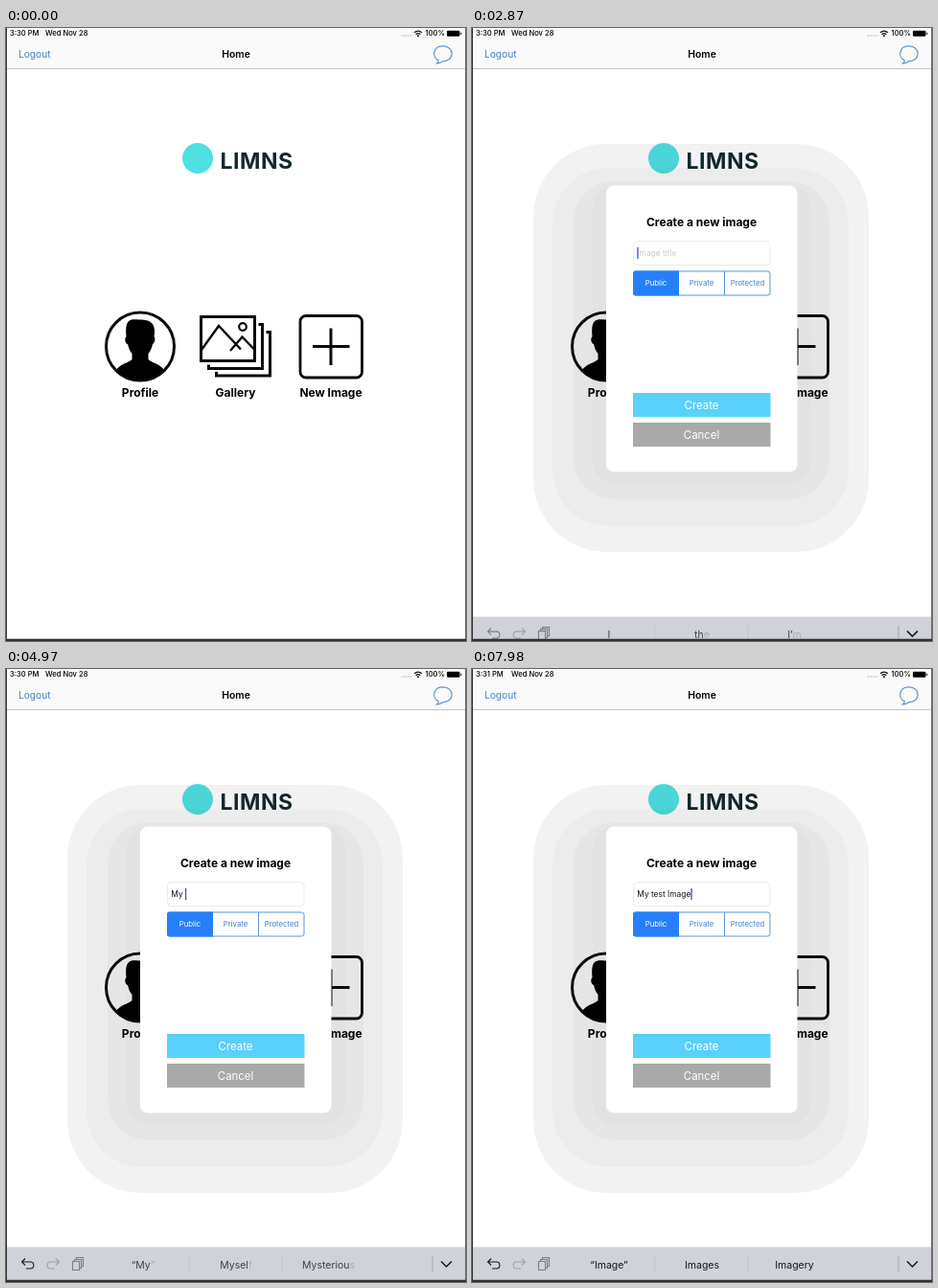
Recreate the animation shown at these times as an HTML page. Size 480 px wide and 640 px high, loop 8 s.

```html
<!DOCTYPE html>
<html lang="en">
<head>
<meta charset="utf-8">
<title>New image dialog</title>
<style>
  html, body { margin: 0; width: 100%; height: 100%; overflow: hidden; background: #fff; }
  svg { display: block; width: 480px; height: 640px; font-family: Inter, Roboto, sans-serif; }
  text { white-space: pre; }
  .mid { text-anchor: middle; }
  .bold { font-weight: 700; font-size: 12px; }
  .status { font-size: 7.6px; font-weight: 500; }
  .line { fill: none; stroke: #0b0b0b; stroke-width: 3; }
  .blue { fill: #4581c6; }
  .seg { font-size: 7.8px; }
  .field { font-size: 8.4px; }
  .action { font-size: 11.4px; fill: #fff; }
  .hint { font-size: 10.5px; fill: #16171a; }
  .tool { fill: none; stroke: #7b7d84; stroke-width: 1.1; }
</style>
</head>
<body>
<svg viewBox="0 0 480 640">
  <defs>
    <clipPath id="portrait"><circle cx="140" cy="332.500" r="35"/></clipPath>
  </defs>
  <rect width="480" height="640" fill="#fff"/>
  <rect width="480" height="43" fill="#fafafa"/>
  <path d="M0 42.500H480" stroke="#c4c4c4"/>

  <g class="status">
    <text id="clock" x="4" y="8.300">3:30 PM</text>
    <text x="41" y="8.300">Wed Nov 28</text>
    <text x="437.500" y="8.300">100%</text>
  </g>
  <path d="M412.500 8H424" stroke="#b5b5b5" stroke-dasharray="2 1"/>
  <g fill="none" stroke="#111" stroke-width="1.300">
    <path d="M426 4.800Q430 1.400 434 4.800M427.600 6.700Q430 4.700 432.400 6.700"/>
    <circle cx="430" cy="8.200" r=".4"/>
  </g>
  <rect x="460" y="2.800" width="13.500" height="6" rx="1.300"/>
  <path d="M474.800 4.700V7" stroke="#111"/>

  <text class="blue" x="13" y="31.300" font-size="10.200">Logout</text>
  <text class="mid" x="240" y="31.300" font-size="10.400" font-weight="600">Home</text>
  <path d="M449.500 37C451 36 451.500 35 451.300 33.800C444.500 31 444.800 19 456 18.800C468 19 468.500 34.500 456 34.700Q452.500 37 449.500 37Z"
    fill="none" stroke="#5089c9" stroke-width="1.100"/>

  <circle cx="200" cy="136" r="16" fill="#4fe0e2"/>
  <text x="223.500" y="147" font-size="23" font-weight="700" fill="#14292e" letter-spacing=".5">LIMNS</text>

  <circle class="line" cx="140" cy="332.500" r="35.500"/>
  <g clip-path="url(#portrait)">
    <path d="M125.500 322C123 300 134 305 139 304.500C151 304 157 309 154.500 322C156.500 324 155 329 153 330C152 335 150 338 148.500 340V346C153 351 168 350 169 370H111C112 350 127 351 131.500 346V340C129 337 128 334 127 330C124 329 123.500 324 125.500 322Z"/>
  </g>
  <g class="line">
    <rect x="203.500" y="301.500" width="56" height="46"/>
    <path d="M204 336L222 311L245 335.500M234 337L246.500 322.500L259 335.500" stroke-width="2.400"/>
    <circle cx="247" cy="312" r="3.800" stroke-width="2.200"/>
    <path d="M263.500 309.500H267.500V355.500H211.500V351.500M271.500 317.500H275.500V363H219.500V359"/>
  </g>
  <g id="newIcon" class="line">
    <rect x="307" y="300.500" width="64.500" height="64.500" rx="6" stroke-width="2.800"/>
    <path d="M320 332.500H358.500M339 313.500V352"/>
  </g>
  <g class="bold mid">
    <text x="140" y="385.300">Profile</text>
    <text x="239.500" y="385.300">Gallery</text>
    <text x="339" y="385.300">New Image</text>
  </g>

  <g id="popup">
    <rect x="64" y="121" width="350" height="426" rx="76" fill-opacity=".05"/>
    <rect x="84" y="146" width="309" height="374" rx="58" fill-opacity=".025"/>
    <rect x="106" y="160" width="267" height="332" rx="42" fill-opacity=".022"/>
    <rect x="126" y="164" width="228" height="312" rx="24" fill-opacity=".02"/>
    <rect x="140" y="164.500" width="199.500" height="299" rx="8" fill="#fff"/>
    <text class="bold mid" x="239.500" y="207">Create a new image</text>
    <rect x="168.500" y="222.500" width="142.500" height="25" rx="4" fill="#fff" stroke="#ebebeb"/>
    <text id="field" class="field" x="172.300" y="238"></text>
    <rect id="caret" x="172" y="229" width="1.300" height="12" fill="#3d57a8"/>
    <rect x="168.500" y="254" width="142.500" height="25" rx="2.500" fill="#fff" stroke="#5a94dc"/>
    <path d="M263.500 254V279" stroke="#5a94dc"/>
    <path d="M216 253.500V279.500H170.500Q168 279.500 168 277V256Q168 253.500 170.500 253.500Z" fill="#267ffa"/>
    <g class="seg mid blue">
      <text x="192" y="269.300" fill="#fff" style="fill:#fff">Public</text>
      <text x="239.500" y="269.300">Private</text>
      <text x="287.500" y="269.300">Protected</text>
    </g>
    <rect x="168" y="381" width="143.500" height="25" fill="#5ad0fc"/>
    <rect x="168" y="412" width="143.500" height="25" fill="#a9a9a9"/>
    <g class="action mid">
      <text x="239.500" y="397.800">Create</text>
      <text x="239.500" y="428.800">Cancel</text>
    </g>
  </g>

  <g id="bar">
    <rect y="603.500" width="480" height="40" fill="#d0d2d9"/>
    <path d="M191 613V629M288 613V629" stroke="#c3c5cc"/>
    <path d="M445 613V629" stroke="#a4a6ad"/>
    <g class="tool">
      <path id="undo" d="M20 615.500L16.500 619L20 622.500M16.500 619H25.500C30 619 30 626 25.500 626H21"/>
      <path d="M52 615.500L55.500 619L52 622.500M55.500 619H46.500C42 619 42 626 46.500 626H51" stroke="#a0a2a9"/>
      <path d="M69.500 618.500H76.500V627.500H69.500ZM71.500 618V616.500H78.500V625.500H77M73.500 616V614.500H80.500V623.500H79"/>
      <path d="M454 618.500L459.500 624L465 618.500" stroke="#17181b" stroke-width="1.500"/>
    </g>
    <g id="hints" class="hint mid">
      <text x="143" y="625.500"><tspan></tspan><tspan></tspan></text>
      <text x="240" y="625.500"><tspan></tspan><tspan></tspan></text>
      <text x="336.500" y="625.500"><tspan></tspan><tspan></tspan></text>
    </g>
  </g>

  <path d="M.5 0V640" stroke="#3a3a3a"/>
  <path d="M479.500 0V640" stroke="#777"/>
  <path d="M0 639H480" stroke="#303030" stroke-width="2.400"/>
</svg>

<script>
const LOOP = 8000, STEP = 70, FOCUS = 2800;
const TITLE = 'My test Image';
const keyTimes = [4480, 4690, 4900, 5110, 5250, 5390, 5530, 5670, 5810, 5950, 6090, 6300, 6510];
const suggestions = [
  [2800, 'I', 'the', 'I’m'],
  [4690, '“M”', 'My', 'Me'],
  [4900, '“My”', 'Myself', 'Mysterious'],
  [5180, 'name', 'own', 'new'],
  [5460, '“te”', 'Tell', 'Ten'],
  [5740, '“test”', 'Tests', 'Testing'],
  [6090, '“I”', 'Is', 'In'],
  [6720, '“Image”', 'Images', 'Imagery']
];

const get = id => document.getElementById(id);
const [clock, newIcon, popup, field, caret, bar, undo, hints] =
  ['clock', 'newIcon', 'popup', 'field', 'caret', 'bar', 'undo', 'hints'].map(get);
const progress = (t, start, length) => Math.min(1, Math.max(0, (t - start) / length));

function drawPopup(t) {
  const p = progress(t, 560, 280);
  const eased = p * p * (3 - 2 * p);
  const scale = 1.3 - 0.3 * eased;
  popup.setAttribute('opacity', eased);
  popup.setAttribute('transform', `translate(240 320) scale(${scale}) translate(-240 -320)`);
  newIcon.setAttribute('opacity', t < 490 ? 1 : 0.35 + 0.65 * progress(t, 840, 490));
}

function drawField(t) {
  const typed = keyTimes.filter(k => k <= t).length;
  field.textContent = typed ? TITLE.slice(0, typed) : 'Image title';
  field.setAttribute('fill', typed ? '#151515' : '#c9c9cd');
  const width = typed ? field.getComputedTextLength() : 0;
  const lastInput = typed ? keyTimes[typed - 1] : FOCUS;
  const visible = t >= FOCUS && (t - lastInput) % 1000 < 500;
  caret.setAttribute('x', 172.3 + width);
  caret.setAttribute('opacity', visible ? 1 : 0);
  undo.setAttribute('stroke', typed ? '#17181b' : '#7b7d84');
}

function drawBar(t) {
  const left = 1 - progress(t, 2730, 350);
  bar.setAttribute('transform', `translate(0 ${36 * left ** 2.3})`);
  const current = suggestions.filter(s => s[0] <= t).pop();
  hints.setAttribute('opacity', current ? 1 : 0);
  if (!current) return;
  const [start, ...words] = current;
  // The last letter of each word settles after the rest.
  const body = 0.25 + 0.75 * progress(t, start, 100);
  const tail = 0.1 + 0.9 * progress(t, start + 60, 100);
  words.forEach((word, i) => {
    const [head, end] = hints.children[i].children;
    const cut = Math.max(1, word.length - 1);
    head.textContent = word.slice(0, cut);
    end.textContent = word.slice(cut);
    head.setAttribute('fill-opacity', body);
    end.setAttribute('fill-opacity', tail);
  });
}

function draw(now) {
  const t = Math.floor(now % LOOP / STEP) * STEP;
  clock.textContent = t < 6860 ? '3:30 PM' : '3:31 PM';
  drawPopup(t);
  drawField(t);
  drawBar(t);
}

const begin = performance.now();
function tick() {
  draw(performance.now() - begin);
  requestAnimationFrame(tick);
}
tick();
</script>
</body>
</html>
```
